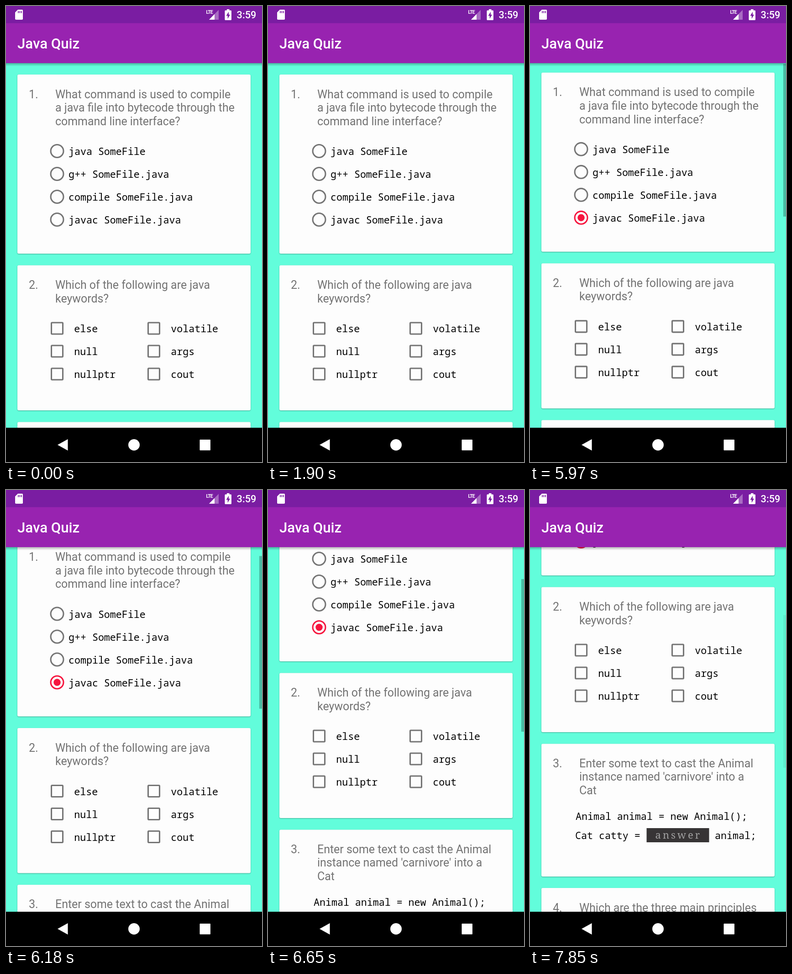
Recreate the animation shown at these times as an HTML page. Size 561 px wide and 998 px high, loop 8000 ms.

```html
<!DOCTYPE html>
<html lang="en">
<head>
<meta charset="utf-8">
<title>Java Quiz</title>
<style>
  html, body { margin: 0; width: 100%; height: 100%; overflow: hidden; background: #000; }
  svg { display: block; width: 100vw; height: 100vh; }
  text { white-space: pre; }
  .ask { font: 24.93px Roboto, sans-serif; fill: #737373; }
  .code { font: 21.64px "Noto Sans Mono", monospace; fill: #000; }
  .hint { font: 300 22px "Noto Serif", serif; letter-spacing: 4px; fill: #a3a3a3; }
  .title { font: 500 31.16px Roboto, sans-serif; fill: #fff; }
  .clock { font: 500 21.8px Roboto, sans-serif; fill: #fff; }
  .lte { font: 700 10.5px Roboto, sans-serif; letter-spacing: -.9px; fill: #fff; }
  .card { fill: #fdfdfd; filter: drop-shadow(0 1.6px 1.2px rgba(0, 0, 0, .34)); }
  .box { fill: none; stroke: #757575; stroke-width: 3.1; }
</style>
</head>
<body>
<svg id="stage" viewBox="0 0 561 998" preserveAspectRatio="none"></svg>
<script>
const LOOP = 8000;
const VIEW_TOP = 125, VIEW_H = 798, PAGE_H = 1906;
const UNIT = 1.55;
const PRESS = 4800;
const RED = '#f6153e', GREY = '#757575';

// Scroll bursts: start, end, steps, from, to, power
const BURSTS = [
  [5970, 6180, 5, 0, 46.5, 1.5],
  [6250, 6420, 4, 46.5, 150, .9],
  [6650, 6650, 1, 150, 167, 1],
  [6710, 6910, 4, 167, 320, .85],
  [7010, 7010, 1, 320, 328, 1],
  [7170, 7230, 3, 328, 341, 1],
  [7500, 7690, 4, 341, 355, .8]
];

const text = (cls, x, y, s) => `<text class="${cls}" x="${x}" y="${y}">${s}</text>`;
const rect = (x, y, w, h, attrs) => `<rect x="${x}" y="${y}" width="${w}" height="${h}" ${attrs}/>`;
const card = (top, bottom) => rect(25, top, 511, bottom - top, 'rx="3" class="card"');
const question = (n, y, ...lines) =>
  text('ask', 50, y, n + '.') + lines.map((s, i) => text('ask', 108, y + i * 29.6, s)).join('');
const radio = (y, s, id) =>
  `<circle ${id ? `id="${id}"` : ''} class="box" cx="112" cy="${y}" r="${9 * UNIT}"/>` + text('code', 137, y + 8.5, s);
const check = (x, y, s) =>
  rect(x - 12.5, y - 12.5, 25, 25, 'rx="1.5" class="box"') + text('code', x + 37.3, y + 8.5, s);

const page = [
  card(150, 542),
  question(1, 201.5, 'What command is used to compile', 'a java file into bytecode through the', 'command line interface?'),
  `<circle id="ripple" cx="112" cy="467.5" fill="#e91e63"/>`,
  radio(317.5, 'java SomeFile'),
  radio(367.5, 'g++ SomeFile.java'),
  radio(417.5, 'compile SomeFile.java'),
  radio(467.5, 'javac SomeFile.java', 'ring'),
  `<circle id="dot" cx="112" cy="467.5" fill="${RED}"/>`,

  card(567.5, 885),
  question(2, 619, 'Which of the following are java', 'keywords?'),
  ...['else', 'null', 'nullptr'].map((s, i) => check(112, 705.5 + i * 50, s)),
  ...['volatile', 'args', 'cout'].map((s, i) => check(324, 705.5 + i * 50, s)),

  card(910.5, 1201),
  question(3, 961.6, 'Enter some text to cast the Animal', "instance named 'carnivore' into a", 'Cat'),
  text('code', 100, 1077, 'Animal animal = new Animal();'),
  text('code', 99, 1119, 'Cat catty ='),
  rect(255.5, 1095, 137, 31, 'fill="#373435"'),
  text('hint', 274.5, 1118, 'answer'),
  text('code', 405, 1119, 'animal;'),

  card(1226, 1640),
  question(4, 1277.6, 'Which are the three main principles')
].join('');

const bars = [
  rect(0, 125, 561, 7, 'fill="url(#shade)"'),
  rect(0, 0, 561, 125, 'fill="#9823b0"'),
  rect(0, 0, 561, 37.5, 'fill="#7a1da2"'),
  text('title', 25, 93, 'Java Quiz'),
  // memory card
  '<path fill="#fff" d="M26 8H35q2 0 2 2V28q0 2-2 2H22q-2 0-2-2V14Z"/>',
  [26, 29.5, 33].map(x => rect(x, 11, 1.8, 4.5, 'fill="#7a1da2"')).join(''),
  // signal
  '<path fill="#fff" opacity=".35" d="M445 30L466 8.5V30Z"/>',
  '<path fill="#fff" d="M445 30L457 17.7V30Z"/>',
  text('lte', 438.5, 17, 'LTE'),
  // battery
  '<path fill="#fff" d="M484 7h5.500v2.500h3q1.500 0 1.500 1.500V29.500q0 1.500-1.500 1.500H481q-1.500 0-1.500-1.500V11q0-1.500 1.500-1.500h3Z"/>',
  '<path fill="#7a1da2" d="M488 12.500L482.500 21.500H485.800V28L491 19H488Z"/>',
  text('clock', 505.5, 27.3, '3:59'),
  // navigation
  rect(0, 923, 561, 75, ''),
  '<path fill="#fff" d="M113 960.500L135.500 948V973Z"/>',
  '<circle fill="#fff" cx="280.500" cy="960.500" r="12.500"/>',
  rect(424.5, 949, 23.5, 23.5, 'rx="1" fill="#fff"')
].join('');

const stage = document.getElementById('stage');
stage.innerHTML = `
  <defs><linearGradient id="shade" x2="0" y2="1">
    <stop stop-opacity=".28"/><stop offset="1" stop-opacity="0"/>
  </linearGradient></defs>
  ${rect(0, 0, 561, 998, 'fill="#62fddb"')}
  <g id="page">${page}</g>
  ${rect(555, 0, 6, VIEW_H * VIEW_H / PAGE_H, 'id="thumb"')}
  ${bars}`;

const [pageEl, thumb, ring, dot, ripple] =
  ['page', 'thumb', 'ring', 'dot', 'ripple'].map(id => document.getElementById(id));

const clamp = v => Math.max(0, Math.min(1, v));
const mix = (a, b, k) => a + (b - a) * k;
const set = (el, attrs) => { for (const k in attrs) el.setAttribute(k, attrs[k]); };

function scrollAt(t) {
  let y = 0;
  for (const [start, end, n, from, to, power] of BURSTS) {
    if (t < start) break;
    const gap = (end - start) / (n - 1 || 1);
    const step = gap ? Math.min(n, Math.floor((t - start) / gap + 1e-6) + 1) : 1;
    y = mix(from, to, (step / n) ** power);
  }
  return y;
}

function drawRadio(t) {
  const on = t >= PRESS;
  const age = t - PRESS - 40;
  const fill = clamp(age / 166), settle = clamp((age - 166) / 167);
  let scale = mix(1, .5, fill), width = mix(2, 18, fill), core = 0;
  if (fill === 1) {
    scale = mix(.9, 1, settle);
    width = 2;
    core = mix(7, 5, settle);
  }
  set(ring, { r: 9 * UNIT * scale });
  ring.style.stroke = on ? RED : GREY;
  ring.style.strokeWidth = width * scale * UNIT;
  set(dot, { r: core * UNIT });

  const rise = mix(.02, .13, clamp((t - PRESS) / 130));
  const fade = 1 - clamp((t - PRESS - 200) / 290);
  set(ripple, { r: mix(28, 31, clamp((t - PRESS) / 200)), opacity: on ? rise * fade : 0 });
}

function draw(t) {
  const y = scrollAt(t);
  set(pageEl, { transform: `translate(0 ${-y})` });
  set(thumb, {
    y: VIEW_TOP + y * VIEW_H / PAGE_H,
    opacity: t < 5970 ? 0 : t < 7850 ? .26 : .06
  });
  drawRadio(t);
}

function tick() {
  draw(performance.now() % LOOP);
  requestAnimationFrame(tick);
}
tick();
</script>
</body>
</html>
```
